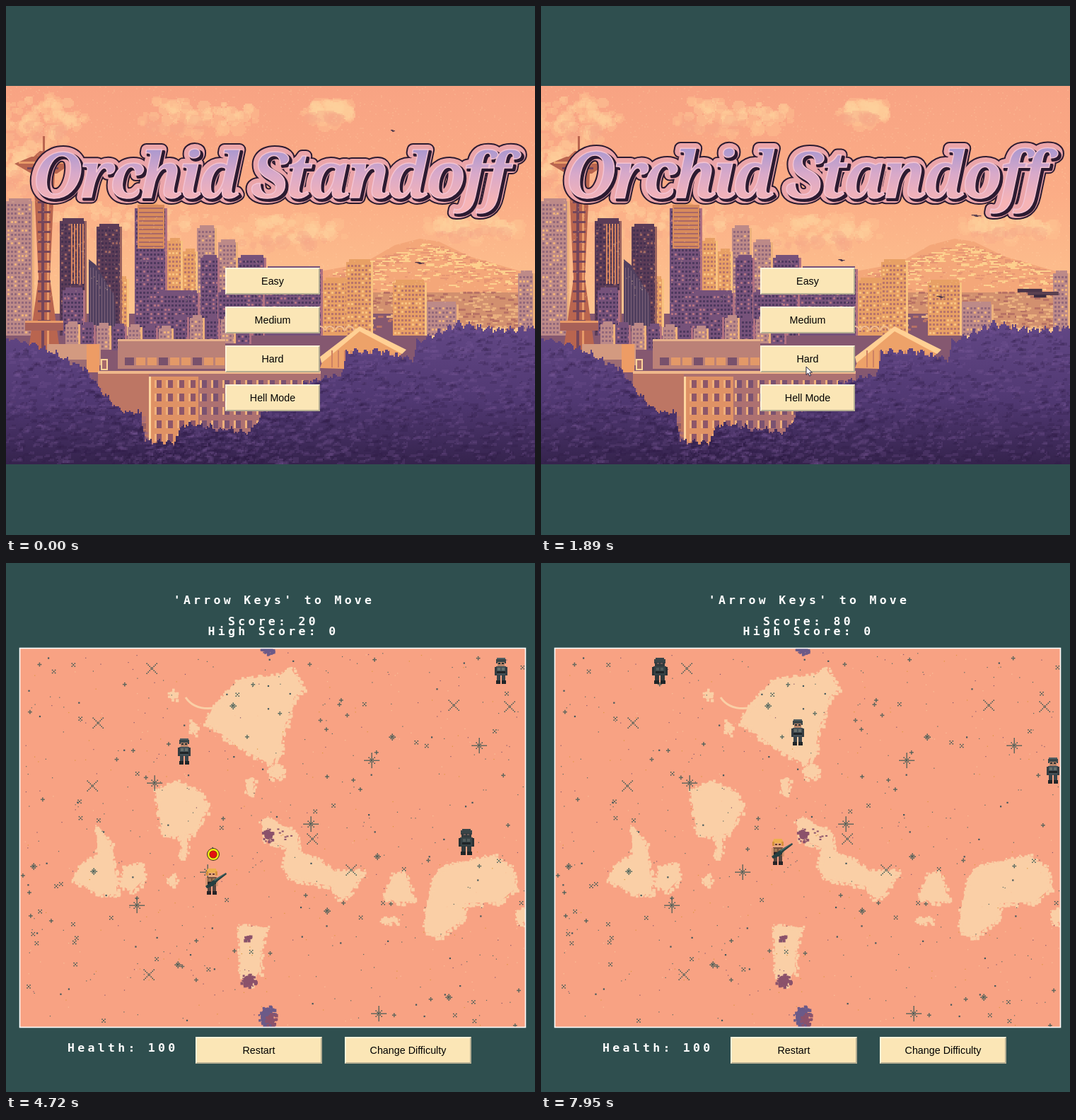
An HTML page with a canvas that plays this animation: 748 by 748 pixels, repeating every 8 s.

```html
<!DOCTYPE html>
<html lang="en">
<head>
<meta charset="utf-8">
<title>Orchid Standoff</title>
<style>
html, body { margin: 0; width: 100%; height: 100%; overflow: hidden; background: #2f4f4f; }
#stage { position: relative; width: 748px; height: 748px; overflow: hidden; background: #2f4f4f; }
.screen, canvas, svg { position: absolute; left: 0; top: 0; width: 748px; height: 748px; }
.btn {
  position: absolute; box-sizing: border-box; height: 38px; width: 134px; left: 310px;
  border: 2px solid; border-color: #fff3d9 #b5ae92 #b5ae92 #fff3d9;
  background: #fbe6b6; color: #000; text-align: center;
  font: 14.3px/34px "Liberation Sans", Arial, sans-serif;
}
#game .btn { width: 179px; top: 670px; }
.hud { font: bold 16.5px "DejaVu Sans Mono", monospace; letter-spacing: 4.3px; fill: #fff; }
.mid { text-anchor: middle; }
.title { font: italic bold 90px "Noto Serif", "DejaVu Serif", serif; letter-spacing: -4.5px; text-anchor: middle; stroke-linejoin: round; }
</style>
</head>
<body>
<div id="stage">
  <div class="screen" id="menu">
    <canvas id="city" width="748" height="748"></canvas>
    <canvas id="sky" width="748" height="748"></canvas>
    <svg viewBox="0 0 748 748">
      <defs>
        <linearGradient id="fade" gradientUnits="userSpaceOnUse" x1="0" y1="200" x2="0" y2="276">
          <stop offset="0" stop-color="#a797cf"/><stop offset=".5" stop-color="#d9a9c9"/><stop offset="1" stop-color="#f6b4b6"/>
        </linearGradient>
      </defs>
      <g id="logo" class="title">
        <text x="373" y="271" fill="#2c1b31" stroke="#2c1b31" stroke-width="18">Orchid Standoff</text>
        <text x="373" y="271" fill="#eba5a9" stroke="#eba5a9" stroke-width="14">Orchid Standoff</text>
        <text x="376" y="274" fill="#2c1b31" stroke="#2c1b31" stroke-width="4">Orchid Standoff</text>
        <text x="373" y="271" fill="url(#fade)" stroke="#f3c3d2" stroke-width="1.5">Orchid Standoff</text>
      </g>
    </svg>
    <div class="btn" style="top:370px">Easy</div>
    <div class="btn" style="top:425px">Medium</div>
    <div class="btn" style="top:480px">Hard</div>
    <div class="btn" style="top:535px">Hell Mode</div>
    <svg viewBox="0 0 748 748">
      <path id="cursor" d="M0 0V11.5L2.7 9L4.6 13.2L6.6 12.3L4.8 8.2H8.4Z" fill="#fff" stroke="#26203a"/>
    </svg>
  </div>
  <div class="screen" id="game">
    <canvas id="field" width="748" height="748"></canvas>
    <canvas id="actors" width="748" height="748"></canvas>
    <svg viewBox="0 0 748 748">
      <rect x="19.5" y="120.5" width="715" height="536" fill="none" stroke="#fff" stroke-width="1.6"/>
      <g class="hud">
        <text class="mid" x="379" y="58">'Arrow Keys' to Move</text>
        <text class="mid" x="378" y="88" id="score">Score: 0</text>
        <text class="mid" x="378" y="102">High Score: 0</text>
        <text x="87" y="691">Health: 100</text>
      </g>
    </svg>
    <div class="btn" style="left:268px">Restart</div>
    <div class="btn" style="left:479px">Change Difficulty</div>
  </div>
</div>
<script>
const $ = id => document.getElementById(id);
const ctxOf = id => $(id).getContext('2d');

let seed = 7;
function rnd() {
  seed = (seed * 1664525 + 1013904223) >>> 0;
  return seed / 2 ** 32;
}
const span = (a, b) => a + rnd() * (b - a);
const even = v => Math.round(v / 2) * 2;

// Linear interpolation through rows of [key, ...values].
function at(rows, k) {
  let i = 0;
  while (i < rows.length - 2 && k >= rows[i + 1][0]) i++;
  const a = rows[i], b = rows[i + 1];
  const f = Math.min(1, Math.max(0, (k - a[0]) / (b[0] - a[0])));
  return a.slice(1).map((v, j) => v + (b[j + 1] - v) * f);
}

function rect(c, x, y, w, h, color) {
  c.fillStyle = color;
  c.fillRect(x, y, w, h);
}

function poly(c, color, ...pts) {
  c.fillStyle = color;
  c.beginPath();
  for (let i = 0; i < pts.length; i += 2) c.lineTo(pts[i], pts[i + 1]);
  c.fill();
}

function clip(c, x, y, w, h) {
  c.save();
  c.beginPath();
  c.rect(x, y, w, h);
  c.clip();
}

// ---- Menu scenery ----
function puff(c, cx, cy, rx, ry, color, n) {
  c.fillStyle = color;
  for (let i = 0; i < n; i++) {
    const a = span(0, 2 * Math.PI), d = Math.sqrt(rnd()), r = span(3, 11);
    const x = cx + Math.cos(a) * d * rx, y = cy + Math.sin(a) * d * ry;
    for (let k = -r; k < r; k += 2) {
      const half = Math.sqrt(r * r - k * k);
      c.fillRect(even(x - half), even(y + k), even(half * 2), 2);
    }
  }
}

function cloud(c, x, y, rx, ry) {
  puff(c, x, y, rx, ry, '#fdc19173', 45);
  puff(c, x + 4, y - 5, rx * .85, ry * .7, '#fdcf9c66', 28);
  puff(c, x - 6, y + ry / 2, rx * .8, ry / 3, '#f6a88766', 14);
}

function tower(c, x, y, w, h, [wall, glass, lit]) {
  rect(c, x, y, w, h, wall);
  rect(c, x + 4, y - 4, w - 8, 4, wall);
  for (let v = y + 4; v < y + h - 2; v += 6)
    for (let u = x + 2; u < x + w - 2; u += 5)
      rect(c, u, v, 3, 3, rnd() < .22 ? lit : glass);
  rect(c, x + w - 3, y, 3, h, lit);
}

const hazy = ['#bd8a88', '#93697b', '#edb17b'], violet = ['#76527a', '#4e395f', '#b17181'];
const gold = ['#e8a065', '#b9756a', '#f8c27f'], dark = ['#5b3c57', '#44304f', '#9c635f'];

function drawCity(c) {
  clip(c, 0, 113, 748, 535);
  const sky = c.createLinearGradient(0, 113, 0, 440);
  sky.addColorStop(0, '#f8a383');
  sky.addColorStop(.45, '#fbac86');
  sky.addColorStop(1, '#fdc58f');
  rect(c, 0, 113, 748, 535, sky);

  cloud(c, 50, 160, 62, 36);
  cloud(c, 20, 230, 55, 40);
  cloud(c, 270, 155, 85, 28);
  cloud(c, 455, 150, 38, 16);
  cloud(c, 660, 312, 80, 18);
  cloud(c, 390, 320, 95, 24);
  cloud(c, 170, 300, 130, 35);

  poly(c, '#f4a779', 435, 450, 445, 375, 505, 364, 550, 338, 585, 329, 612, 333, 655, 354, 748, 381, 748, 450);
  for (let i = 0; i < 520; i++) {
    const x = span(460, 745), top = 330 + Math.abs(x - 592) * .34;
    rect(c, even(x), even(top + rnd() * rnd() * 65 + 3), span(3, 12), 2, rnd() < .6 ? '#fdcf8d' : '#e79673');
  }
  rect(c, 440, 405, 308, 50, '#d2906f');
  rect(c, 0, 435, 600, 215, '#855870');
  for (let i = 0; i < 330; i++)
    rect(c, even(span(445, 748)), even(span(403, 456)), span(3, 10), 3, rnd() < .5 ? '#b87265' : '#eab07e');

  const row = (look, ...spots) => spots.forEach(([x, y, w]) => tower(c, x, y, w, 466 - y, look));
  row(hazy, [0, 276, 40], [270, 314, 28], [300, 334, 28], [590, 422, 50], [724, 378, 24]);
  row(violet, [328, 356, 40], [182, 286, 46], [366, 372, 82], [275, 356, 27]);
  row(gold, [250, 347, 21], [150, 386, 24], [228, 332, 22], [448, 388, 50], [481, 362, 38], [547, 391, 48]);
  row(dark, [76, 304, 38], [128, 312, 36]);
  row(violet, [80, 402, 32], [212, 406, 62], [300, 405, 66]);

  rect(c, 186, 281, 38, 62, '#d88b5c');
  for (let y = 285; y < 342; y += 6) rect(c, 188, y, 34, 2, y % 4 ? '#a96867' : '#f5b46c');
  poly(c, '#efa76b', 192, 281, 204, 274, 216, 281);
  for (let x = 92; x < 112; x += 4) rect(c, x, 308, 2, 85, '#d5855f');
  poly(c, '#51405f', 117, 460, 117, 358, 127, 366, 153, 410, 156, 460);
  for (let x = 119; x < 154; x += 4) rect(c, x, 370 + Math.max(0, x - 124) * 1.3, 1, 82, '#7d6278');
  for (let x = 84; x < 330; x += 22) tower(c, x, 440 + x * 7 % 17, 21, 34, x % 4 ? violet : hazy);
  c.strokeStyle = '#f1bd92';
  c.lineWidth = 2;
  for (let x = 444; x < 490; x += 14) {
    c.beginPath();
    c.arc(x, 459, 6, Math.PI, 0);
    c.stroke();
  }
  drawNeedle(c);
  drawLowBlocks(c);
  drawTrees(c);
  for (let i = 0; i < 1800; i++) rect(c, even(span(0, 748)), even(span(113, 420)), 2, 2, '#ffd7a529');
  c.restore();
}

function drawNeedle(c) {
  const rust = '#b9654f', glow = '#e89a68', shade = '#75465a';
  rect(c, 52, 184, 3, 26, rust);
  poly(c, rust, 38, 214, 48, 205, 60, 205, 70, 214);
  poly(c, rust, 12, 223, 36, 213, 70, 213, 92, 223, 72, 237, 36, 237);
  rect(c, 18, 220, 68, 3, glow);
  rect(c, 30, 228, 44, 3, shade);
  poly(c, rust, 39, 236, 69, 236, 62, 385, 78, 500, 30, 500, 46, 385);
  rect(c, 50, 238, 4, 260, shade);
  rect(c, 58, 238, 3, 260, glow);
  for (let y = 248; y < 445; y += 14) rect(c, 45, y, 18, 3, shade);
  rect(c, 27, 445, 54, 14, '#a76058');
  rect(c, 27, 445, 54, 3, glow);
}

function drawLowBlocks(c) {
  rect(c, 58, 478, 76, 30, '#d39a80');
  rect(c, 58, 500, 74, 16, '#9d6c73');
  rect(c, 114, 478, 18, 40, '#ed9c65');
  rect(c, 134, 499, 10, 16, '#ffd49a');
  rect(c, 136, 501, 6, 12, '#a76b6c');
  rect(c, 158, 471, 152, 42, '#bb8177');
  rect(c, 158, 471, 152, 3, '#e7b18b');
  for (let x = 168; x < 300; x += 16) rect(c, x, 497, 13, 11, x % 3 ? '#e39968' : '#78516c');
  rect(c, 130, 518, 315, 130, '#ad7171');
  rect(c, 130, 516, 315, 4, '#efb78b');
  rect(c, 130, 520, 72, 128, '#bd7664');
  rect(c, 204, 524, 68, 124, '#df9265');
  rect(c, 202, 524, 3, 92, '#ffd69f');
  for (let y = 529; y < 615; y += 19)
    for (let x = 210; x < 440; x += 16) {
      rect(c, x, y, 10, 11, x < 270 ? '#8d5669' : '#7a5271');
      rect(c, x, y, 3, 11, '#efb07b');
    }
  poly(c, '#eda269', 444, 512, 452, 490, 500, 457, 562, 487, 545, 515);
  poly(c, '#ffd094', 444, 496, 500, 453, 566, 486, 560, 492, 500, 460, 446, 505);
  for (let x = 460; x < 550; x += 9) rect(c, x, 487, 2, 24, '#cd8164');
}

function drawTrees(c) {
  const crest = [[0, 470], [40, 478], [110, 512], [135, 545], [160, 572], [190, 577], [196, 614], [235, 618],
    [250, 592], [345, 602], [365, 570], [430, 530], [475, 520], [480, 489], [525, 487], [575, 500],
    [580, 476], [640, 449], [690, 458], [748, 455]];
  const top = x => at(crest, x)[0];
  const shade = c.createLinearGradient(0, 450, 0, 648);
  shade.addColorStop(0, '#624785');
  shade.addColorStop(.55, '#503872');
  shade.addColorStop(1, '#35234d');
  for (let x = 0; x < 748; x += 2) {
    const y = even(top(x) + Math.sin(x * .43) * 3 + span(-3, 3));
    rect(c, x, y, 2, 650 - y, shade);
  }
  for (let i = 0; i < 2600; i++) {
    const x = even(span(0, 748)), y = even(span(top(x) + 2, 646)), w = even(span(3, 12));
    const tint = rnd() < .5 ? '#7e5c9a33' : '#2a1a4238';
    rect(c, x, y, w, 2, tint);
    rect(c, x + 2, y - 2, w - 2, 2, tint);
  }
}

// Each bird flies through rows of [time, x, y, wingspan].
const birds = [
  [[0, 547, 176, 6], [780, 125, 161, 18], [1080, -40, 155, 24]],
  [[0, 585, 363, 13], [780, 563, 353, 18], [1890, 425, 359, 9]],
  [[390, 165, 330, 16], [780, 5, 263, 30], [900, -40, 245, 34]],
  [[780, 743, 189, 20], [2200, 580, 326, 12]],
  [[1300, 790, 385, 60], [2200, 657, 414, 57]],
  [[1300, 610, 420, 12], [2200, 542, 406, 12]]
];
const cursorPath = [[390, 336, 640], [780, 347, 421], [1690, 375, 508], [1890, 375, 510]];

function drawBird(c, x, y, w) {
  const h = Math.max(1, w / 14);
  rect(c, x - w / 2, y - h, w * .6, h * 1.2, '#493448');
  rect(c, x - w / 4, y, w * .75, h * 1.2, '#5a4050');
  rect(c, x - w / 10, y + h, w * .3, h, '#3b2b40');
}

// ---- Game field ----
const cream = '#facfa6', plum = '#8b526b', iris = '#6b5a88';
const plus = [[1, 0], [0, 1]], cross = [[1, 1], [1, -1]];

// A polygon with a crumbly edge.
function blob(c, color, ...pts) {
  poly(c, color, ...pts);
  for (let i = 0; i < pts.length; i += 2) {
    const j = (i + 2) % pts.length, dx = pts[j] - pts[i], dy = pts[j + 1] - pts[i + 1];
    const n = Math.hypot(dx, dy) / 1.5;
    for (let k = 0; k < n; k++) {
      const s = span(1.5, 5);
      c.fillRect(pts[i] + dx * k / n + span(-4, 3), pts[i + 1] + dy * k / n + span(-4, 3), s, s);
    }
  }
}

function spot(c, color, x, y, rx, ry) {
  const pts = [];
  for (let a = 0; a < 6.2; a += .7) pts.push(x + Math.cos(a) * rx, y + Math.sin(a) * ry);
  blob(c, color, ...pts);
}

function star(c, x, y, r, dirs) {
  for (const [dx, dy] of dirs)
    for (let k = -r; k <= r; k += 2) rect(c, x + dx * k - .5, y + dy * k - .5, 1.5, 1.5, '#355653');
}

function drawField(c) {
  clip(c, 20, 121, 714, 535);
  rect(c, 20, 121, 714, 535, '#f8a283');
  blob(c, cream, 282, 225, 294, 202, 330, 165, 386, 159, 403, 149, 420, 178, 407, 190, 391, 240, 388, 268, 373, 284, 330, 260);
  blob(c, cream, 212, 323, 240, 308, 275, 325, 284, 345, 267, 382, 242, 386, 221, 382);
  blob(c, cream, 246, 384, 256, 384, 256, 404, 246, 417, 250, 400);
  blob(c, cream, 128, 374, 146, 395, 153, 430, 157, 469, 130, 466, 95, 448, 105, 427, 130, 415);
  blob(c, cream, 163, 456, 167, 430, 192, 426, 197, 445, 178, 464);
  blob(c, cream, 361, 366, 370, 361, 411, 382, 414, 408, 444, 422, 463, 436, 504, 436, 484, 471, 470, 473, 460, 457, 402, 446, 392, 430, 397, 402, 368, 392);
  blob(c, cream, 534, 473, 548, 440, 564, 438, 576, 478, 553, 479);
  blob(c, cream, 604, 445, 616, 430, 690, 414, 716, 433, 720, 460, 698, 479, 649, 481, 647, 504, 611, 528, 592, 520, 594, 490);
  blob(c, cream, 330, 513, 369, 516, 359, 545, 359, 576, 344, 598, 332, 583);
  spot(c, cream, 382, 295, 10, 9);
  spot(c, cream, 345, 316, 5, 12);
  spot(c, cream, 264, 232, 3, 8);
  spot(c, cream, 236, 186, 4, 5);
  spot(c, cream, 235, 449, 5, 7);
  spot(c, cream, 542, 505, 11, 3);
  spot(c, cream, 728, 500, 6, 10);
  c.strokeStyle = cream;
  c.lineWidth = 3;
  c.beginPath();
  c.moveTo(254, 190);
  c.quadraticCurveTo(270, 214, 312, 201);
  c.stroke();
  spot(c, iris, 370, 123, 7, 4);
  spot(c, plum, 370, 384, 5, 7);
  spot(c, plum, 342, 529, 3, 2);
  spot(c, plum, 343, 590, 8, 7);
  spot(c, iris, 369, 642, 9, 14);
  spot(c, plum, 374, 645, 5, 6);
  for (let i = 0; i < 7; i++) rect(c, span(382, 405), span(374, 390), 3, 2, plum);

  const dust = ['#dc963f', '#82556c', '#fac49b', '#526762', '#526762'];
  for (let i = 0; i < 760; i++) {
    const x = span(22, 732), y = span(123, 654), k = rnd();
    if (k < .7) rect(c, x, y, 1.2, 1.2, dust[i % 5]);
    else if (k < .76) rect(c, x, y, 2.2, 2.2, '#42575c');
    else if (k < .86) star(c, x, y, 2, i % 2 ? plus : cross);
  }
  for (const [x, y] of [[206, 149], [130, 226], [633, 201], [712, 203], [122, 315], [433, 390], [488, 434], [202, 582]])
    star(c, x, y, 7, cross);
  for (const [x, y] of [[210, 311], [517, 279], [669, 258], [431, 369], [285, 437], [185, 484], [527, 637]]) {
    star(c, x, y, 10, plus);
    star(c, x, y, 4, cross);
  }
  for (const [x, y] of [[321, 202], [546, 246], [525, 415], [243, 568], [626, 614], [39, 429], [124, 436], [454, 492]]) {
    star(c, x, y, 4, plus);
    star(c, x, y, 2, cross);
  }
  c.restore();
}

// ---- Actors ----
// Colours: hat, head, eyes, body, arms, vest, legs, boots; bulk widens the body.
const looks = {
  soldier: ['#566164', '#b58469', '#262c2f', '#455157', '#343d42', '#67706c', '#39444a', '#202528'],
  heavy: ['#3a4548', '#323b3e', '#6b5a58', '#374346', '#293235', '#505b5b', '#30393c', '#1e2427'],
  player: ['#edb04f', '#e8a87c', '#6b3a30', '#75503f', '#d69470', '#a07a55', '#54443f', '#272326']
};

function drawFigure(c, kind, x, y) {
  const [hat, head, eyes, body, arms, vest, legs, boots] = looks[kind];
  const bulk = kind === 'heavy' ? 2 : 0;
  const pair = (u, v, w, h, color) => {
    rect(c, -u - w, v, w, h, color);
    rect(c, u, v, w, h, color);
  };
  c.save();
  c.translate(Math.round(x) + (kind === 'player' ? -2 : 0), Math.round(y));
  pair(0, -18, 6, 3, hat);
  pair(0, -16, 7 + bulk / 2, 6, kind === 'soldier' ? '#3a4548' : hat);
  pair(0, -12, 5 + bulk, 7, head);
  pair(1, -11, 3, 2, eyes);
  pair(0, -6, 7 + bulk, 13, body);
  pair(6 + bulk, -5, 3, 12, arms);
  pair(1, -4, 4, 4, vest);
  pair(0, 1, 6, 3, boots);
  pair(1, 6, 5 + bulk / 2, 9, legs);
  pair(1, 14, 6 + bulk / 2, 5, boots);
  if (kind === 'player') {
    pair(5, -14, 3, 6, '#d6913e');
    poly(c, '#253f41', -9, 7, 3, -2, 20, -12, 21, -10, 8, 0, 3, 6, -7, 10);
    poly(c, '#4b6b67', 3, -2, 20, -12, 20, -11, 4, 0);
  }
  c.restore();
}

function drawBullet(c, x, y) {
  const disc = (r, color) => {
    c.fillStyle = color;
    c.beginPath();
    c.arc(x, y, r, 0, 7);
    c.fill();
  };
  disc(9, '#3c3320');
  disc(8, '#f6ee12');
  disc(5.6, '#6d2a12');
  disc(4.9, '#e3130f');
}

// Each track lives from its first to its last [time, x, y].
const tracks = {
  soldier: [
    [[2400, 527, 290], [2990, 430, 302]],
    [[3210, 572, 300], [3390, 545, 306]],
    [[3710, 427, 247], [4720, 252, 266], [5840, 58, 287]],
    [[4620, 710, 149], [6130, 553, 190], [8000, 358, 240]],
    [[4960, 700, 440], [6130, 496, 462], [6900, 365, 476]],
    [[7140, 200, 636], [7900, 149, 573]],
    [[7940, 724, 293], [8000, 724, 293]]
  ],
  heavy: [[[4420, 701, 444], [4720, 651, 394], [6130, 410, 152], [8000, 161, 152]]],
  player: [[[2400, 377, 633], [3010, 391, 419], [3710, 391, 419], [4420, 307, 450], [4720, 293, 450], [6130, 196, 370], [8000, 341, 409]]],
  bullet: [
    [[2610, 385, 500], [2950, 432, 320]],
    [[3710, 410, 368], [4220, 410, 130]],
    [[4720, 293, 412], [5290, 293, 130]]
  ]
};
const hits = [3005, 3405, 5215, 5835, 6890, 7235, 7540, 7940];

drawCity(ctxOf('city'));
drawField(ctxOf('field'));
const sky = ctxOf('sky'), actors = ctxOf('actors');
const alive = (rows, t) => t >= rows[0][0] - 6 && t <= rows[rows.length - 1][0];

function showMenu(t) {
  sky.clearRect(0, 0, 748, 748);
  birds.forEach(b => { if (alive(b, t)) drawBird(sky, ...at(b, t)); });
  const s = 1 + .007 * (1 - Math.cos(t / 1460 * 2 * Math.PI));
  $('logo').setAttribute('transform', `translate(375.5 243) scale(${s}) translate(-375.5 -243)`);
  const [x, y] = at(cursorPath, t);
  $('cursor').setAttribute('transform', `translate(${x} ${y})`);
  $('cursor').style.display = t < 390 ? 'none' : '';
}

function showGame(t) {
  actors.clearRect(0, 0, 748, 748);
  clip(actors, 20, 121, 714, 535);
  for (const kind in tracks)
    for (const rows of tracks[kind]) {
      if (kind !== 'player' && !alive(rows, t)) continue;
      const [x, y] = at(rows, t);
      if (kind === 'bullet') drawBullet(actors, x, y);
      else drawFigure(actors, kind, x, y);
    }
  actors.restore();
  $('score').textContent = 'Score: ' + 10 * hits.filter(h => t >= h).length;
}

let last = -1;
function tick() {
  // The picture advances in steps of about a tenth of a second.
  const t = performance.now() % 8000;
  const n = t < 876 ? Math.floor((t + 4) / 97.8) : 9 + Math.floor((t - 876) / 101);
  if (n !== last) {
    last = n;
    const time = n < 9 ? n * 97.5 : 880 + (n - 9) * 101;
    const playing = n >= 22;
    $('menu').style.display = playing ? 'none' : '';
    $('game').style.display = playing ? '' : 'none';
    if (playing) showGame(time);
    else showMenu(time);
  }
  requestAnimationFrame(tick);
}
tick();
</script>
</body>
</html>
```
